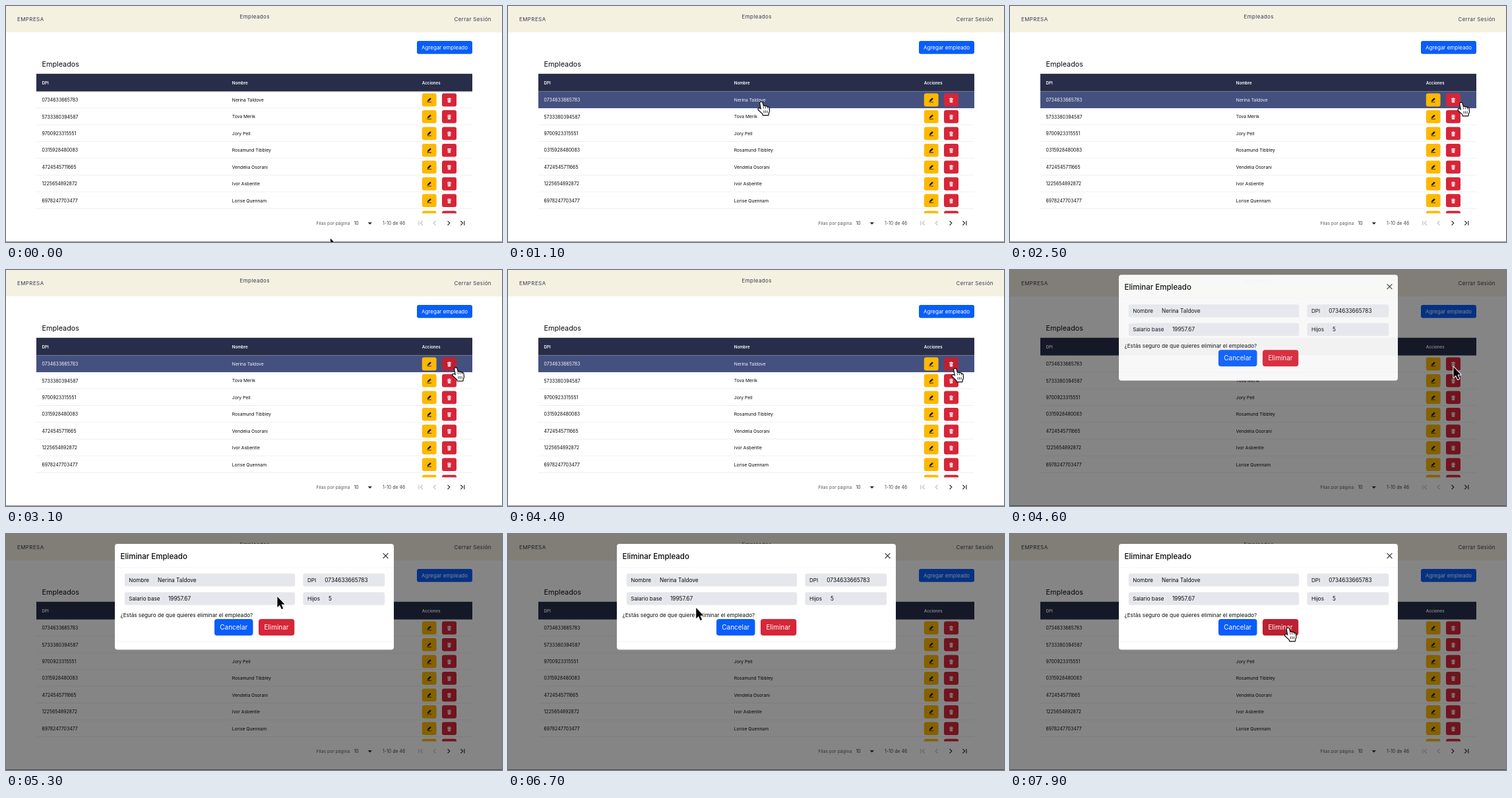
These frames come from a looping animation (752x358 px, 8 s). An HTML page with a canvas:

```html
<!DOCTYPE html>
<html lang="es">
<head>
<meta charset="utf-8">
<title>Empleados</title>
<style>
html, body { margin: 0; width: 100%; height: 100%; overflow: hidden; background: #fff; }
canvas { display: block; width: 752px; height: 358px; }
</style>
</head>
<body>
<canvas id="stage" width="752" height="358"></canvas>
<script>
const ctx = document.getElementById('stage').getContext('2d');
const LOOP = 8000, OPEN = 4400;
const BLUE = '#0a5dfa', RED = '#d62638', RED_DARK = '#bc2032', YELLOW = '#fdb902', INK = '#08090b';
const ROW_TOP = 129.6, ROW_H = 25.45;

const people = [
  ['0734633665783', 'Nerina Taldove'],
  ['5733380394587', 'Tova Merik'],
  ['9700923315551', 'Jory Pell'],
  ['0315928480083', 'Rosamund Tibbley'],
  ['4724545711665', 'Vendelia Osorani'],
  ['1225654892872', 'Ivor Asbentle'],
  ['6978247703477', 'Lorise Quennam'],
  ['', '']
];

// pointer stops: time, x, y
const stops = [
  [0, 491.5, 351.5], [100, 470, 335], [200, 310, 114], [300, 310, 114],
  [700, 293, 148], [800, 293, 148], [1100, 384, 145.5], [1700, 637, 138],
  [1800, 643, 115], [1900, 643, 115], [2200, 665, 98], [2500, 684, 146.5],
  [2800, 684, 147], [3700, 676, 151.5], [3800, 676, 151.5], [4100, 678, 149.5],
  [4400, 678, 149.5], [4600, 672, 146], [5100, 412, 94], [5300, 411, 94],
  [5500, 405, 95], [5600, 405, 95], [5950, 300, 55], [6300, 237, 100],
  [6400, 237, 100], [7300, 421.5, 142.5], [8000, 421.5, 142.5]
];

const clamp = v => Math.max(0, Math.min(1, v));
const inside = (p, x, y, w, h) => p.x >= x && p.x < x + w && p.y >= y && p.y < y + h;
const overCancel = p => inside(p, 316, 129, 58.5, 25);
const overDelete = p => inside(p, 383, 129, 54.3, 25);

function pointerAt(t) {
  const i = Math.max(1, stops.findIndex(s => s[0] > t));
  const [t0, x0, y0] = stops[i - 1], [t1, x1, y1] = stops[i];
  const u = clamp((t - t0) / (t1 - t0)), k = u * u * (3 - 2 * u);
  return { x: x0 + (x1 - x0) * k, y: y0 + (y1 - y0) * k };
}

// cubic-bezier(0, 0, .58, 1)
function easeOut(x) {
  let lo = 0, hi = 1;
  for (let n = 0; n < 20; n++) {
    const s = (lo + hi) / 2;
    if (1.74 * s * s - 0.74 * s * s * s < x) lo = s; else hi = s;
  }
  return lo * lo * (3 - 2 * lo);
}

function text(s, x, cy, size, color = INK, weight = 400, spacing = 0) {
  ctx.font = `${weight} ${size}px Inter, "Open Sans", sans-serif`;
  ctx.letterSpacing = spacing + 'px';
  ctx.fillStyle = color;
  ctx.fillText(s, x, cy + size * 0.36);
}

function rect(x, y, w, h, color) {
  ctx.fillStyle = color;
  ctx.fillRect(x, y, w, h);
}

function box(x, y, w, h, r, color) {
  ctx.fillStyle = color;
  ctx.beginPath();
  ctx.roundRect(x, y, w, h, r);
  ctx.fill();
}

function line(points, color, width) {
  ctx.strokeStyle = color;
  ctx.lineWidth = width;
  ctx.beginPath();
  points.forEach(([x, y], i) => i ? ctx.lineTo(x, y) : ctx.moveTo(x, y));
  ctx.stroke();
}

function shape(d, x, y, fill, stroke, width) {
  const p = new Path2D(d);
  ctx.save();
  ctx.translate(x, y);
  ctx.lineJoin = 'round';
  if (stroke) {
    ctx.strokeStyle = stroke;
    ctx.lineWidth = width;
    ctx.stroke(p);
  }
  ctx.fillStyle = fill;
  ctx.fill(p);
  ctx.restore();
}

function actions(cy, hot) {
  const red = hot ? RED_DARK : RED;
  box(630.8, cy - 10, 21.8, 19.8, 3, YELLOW);
  shape('M-3 2.2L-2.4 .3L1.4 -3.4L3.1 -1.7L-.8 2ZM-3.2 2.9H3.2V3.7H-3.2Z', 641.7, cy, '#17130a');
  box(661, cy - 10, 22, 19.8, 3, red);
  shape('M-3 -2.9H-1.1L-.7 -3.6H.7L1.1 -2.9H3V-2H-3ZM-2.5 -1.5H2.5L2.1 3.6H-2.1Z', 672, cy + .3, '#fff');
  for (let i = -1; i <= 1; i++) rect(671.8 + i * 1.2, cy - .3, .4, 3, red);
}

function table(p, active) {
  rect(46, 102.8, 661, 26.8, '#282e49');
  text('DPI', 54.5, 116.3, 6.2, '#fff', 600);
  text('Nombre', 342.8, 116.3, 6.2, '#fff', 600);
  text('Acciones', 630.8, 116.3, 6.2, '#fff', 600);
  ctx.save();
  ctx.beginPath();
  ctx.rect(46, ROW_TOP, 661, 314.5 - ROW_TOP);
  ctx.clip();
  people.forEach(([id, name], i) => {
    const y = ROW_TOP + i * ROW_H, cy = y + 13;
    const hover = active && inside(p, 46, y, 661, ROW_H);
    if (hover) rect(46, y, 661, ROW_H, '#44517f');
    else rect(46, y + ROW_H - .7, 661, .7, '#e9e9e9');
    const color = hover ? '#f4f5fa' : INK;
    text(id, 54.5, cy, 6.95, color);
    text(name, 342.8, cy, 6.75, color);
    actions(cy, active && inside(p, 661, cy - 10, 22, 19.8));
  });
  ctx.restore();
}

function pager() {
  const y = 329.3, off = '#bdbdbd', on = '#222';
  text('Filas por página', 470.5, y, 6.75, '#5c5c5c');
  text('10', 527.5, y + .2, 6.95, '#333');
  shape('M-3.2 -1.4H3.2L0 1.8Z', 551.8, y + .3, '#222');
  text('1-10 de 46', 571, y, 6.95, '#444');
  const chevron = (x, dir, color) =>
    line([[x - dir * 1.6, y - 3.2], [x + dir * 1.6, y], [x - dir * 1.6, y + 3.2]], color, 1.1);
  line([[625.9, y - 3.4], [625.9, y + 3.4]], off, 1.1);
  chevron(630, -1, off);
  chevron(649.8, -1, off);
  chevron(671.2, 1, on);
  chevron(691, 1, on);
  line([[694.9, y - 3.4], [694.9, y + 3.4]], on, 1.1);
}

function page(p, active) {
  rect(0, 0, 752, 358, '#fff');
  rect(0, 0, 752, 40, '#f5f1e1');
  const ink = '#34394f';
  text('EMPRESA', 17, 20.4, 8, ink, 400, .4);
  text('Empleados', 354.5, 16.3, 8, ink, 400, .4);
  text('Cerrar Sesión', 679.5, 20.4, 8, ink, 400, .35);
  box(623, 53, 84, 19.8, 3, BLUE);
  text('Agregar empleado', 630, 63, 8, '#fff');
  text('Empleados', 54.5, 88, 10.8);
  table(p, active);
  pager();
  rect(0, 357, 752, 1, '#8c8c8c');
}

function field(label, value, x, y, w, split) {
  box(x, y, w, 19.5, 3, '#e6e7ec');
  rect(split, y, .6, 19.5, '#dcdfe4');
  text(label, x + 6.5, y + 9.9, 8.15);
  text(value, split + 6.6, y + 9.9, 8.25);
}

function modal(t, p) {
  const age = t - OPEN;
  if (age <= 0) return;
  rect(0, 0, 752, 358, `rgba(0,0,0,${clamp(age / 150) * .48})`);
  ctx.save();
  ctx.globalAlpha = clamp(age / 212);
  ctx.translate(0, -50 * (1 - easeOut(clamp(age / 300))));
  box(165, 15, 423, 160.5, 4, '#fff');
  text('Eliminar Empleado', 173.5, 33.4, 11.5, INK, 500);
  line([[571.6, 29.2], [579.4, 37]], '#333', 1.1);
  line([[579.4, 29.2], [571.6, 37]], '#333', 1.1);
  rect(165, 50.6, 423, .7, '#eff0f2');
  field('Nombre', people[0][1], 179.8, 60, 258.4, 223.4);
  field('DPI', people[0][0], 450.4, 60, 123.8, 476.7);
  field('Salario base', '19957.67', 179.8, 88.2, 258.4, 239.4);
  field('Hijos', '5', 450.4, 88.2, 123.8, 482.5);
  text('¿Estás seguro de que quieres eliminar el empleado?', 173.5, 123, 8.2);
  box(316, 129, 58.5, 25, 4, overCancel(p) ? '#0a50d4' : BLUE);
  text('Cancelar', 324.3, 141.6, 9.95, '#fff');
  box(383, 129, 54.3, 25, 4, overDelete(p) ? RED_DARK : RED);
  text('Eliminar', 391.4, 141.6, 9.95, '#fff');
  rect(165, 162.7, 423, .7, '#eff0f2');
  ctx.restore();
}

const ARROW = 'M.4 1V17.2L4 13.8L6.8 20L9.3 18.9L6.5 12.8H11.6Z';
const HAND = 'M-1.8 1.6Q-.3 -.8 1.5 1.2L3.1 7Q4.7 5.5 6.1 7.1Q8 6 9.1 8' +
  'Q11 7.2 11.6 9.4L12 14Q11.6 16 10.7 17V19.8H2.6L2.4 18L-4.4 11.6Q-4.8 9.3 -2.5 9.8L0 11.6Z';

function pointer(p, hand) {
  if (!hand) return shape(ARROW, p.x, p.y, '#000', '#fff', 2);
  shape(HAND, p.x, p.y, '#fff', '#000', 2.2);
  for (const x of [4, 6.5, 9]) line([[p.x + x, p.y + 13], [p.x + x + .2, p.y + 16.8]], '#000', .8);
  for (const x of [3.1, 6.1, 9.1]) line([[p.x + x, p.y + 7.3], [p.x + x + .6, p.y + 10]], '#000', .8);
}

function draw(t) {
  const p = pointerAt(t), closed = t <= OPEN;
  page(p, closed);
  modal(t, p);
  const hand = closed
    ? inside(p, 46, ROW_TOP, 661, 314.5 - ROW_TOP)
    : t > 5000 && (overCancel(p) || overDelete(p));
  pointer(p, hand);
}

let start = null;
function tick(now) {
  if (start === null) start = now;
  draw((now - start) % LOOP);
  requestAnimationFrame(tick);
}
draw(0);
requestAnimationFrame(tick);
</script>
</body>
</html>
```
